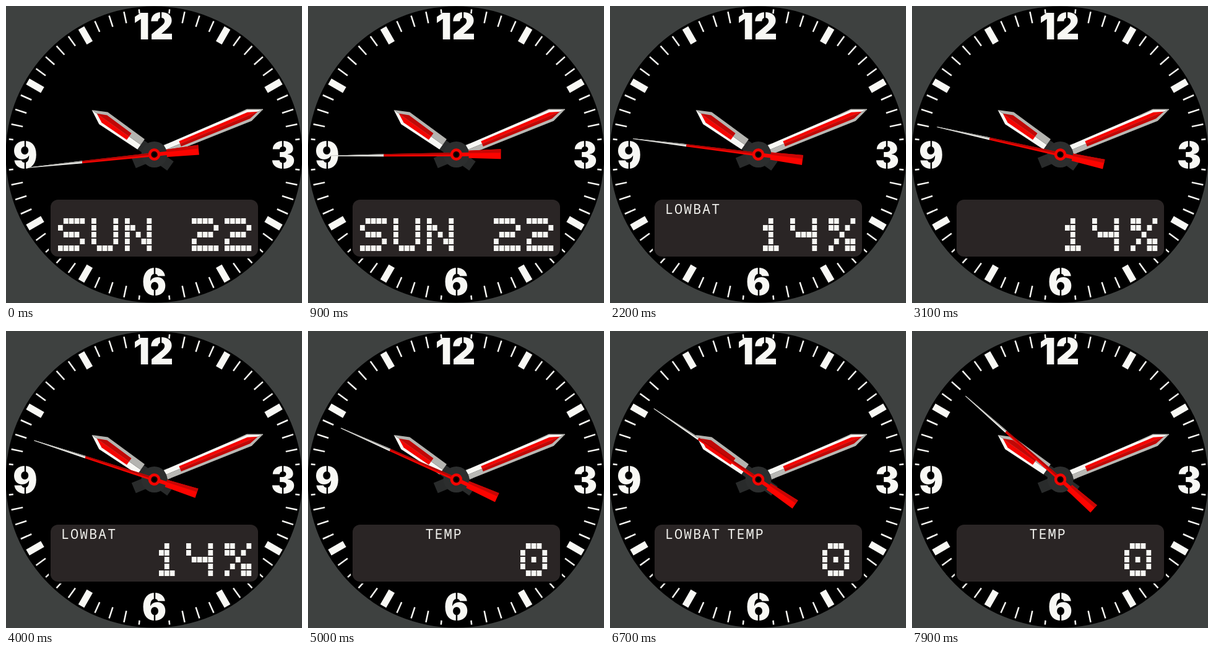
An HTML page for the animation above (8000 ms loop, 478 by 480 pixels).

```html
<!DOCTYPE html>
<html lang="en">
<head>
<meta charset="utf-8">
<title>Watch face</title>
<style>
  html, body { margin: 0; width: 100%; height: 100%; overflow: hidden; background: #3e4140; }
  svg { display: block; width: 100%; height: 100%; }
  .num { font: 900 59px Inter, "Liberation Sans", sans-serif; text-anchor: middle; fill: #f8f8f4; }
  .label { font: 500 22px "Noto Sans Mono", "DejaVu Sans Mono", monospace; letter-spacing: 1.8px; fill: #f0f0ec; }
  .gap { stroke: #000; stroke-width: 2.4; }
</style>
</head>
<body>
<svg viewBox="0 0 478 480">
  <rect width="478" height="480" fill="#3e4140"/>
  <circle cx="239" cy="240" r="239.5"/>
  <g id="ticks" stroke="#f8f8f4" transform="translate(239.5 240)"></g>

  <g class="num">
    <text x="238" y="53.5">12</text>
    <text x="447.5" y="261.5">3</text>
    <text x="239.5" y="467">6</text>
    <text x="31" y="261.5">9</text>
  </g>
  <path class="gap" d="M31 217v13M31 251v13M447 217v13M447 251v13M240 423v13M240 456v13M250 9v12"/>

  <rect x="69" y="310" width="341" height="98" rx="15"/>
  <rect x="72" y="313" width="335" height="92" rx="12" fill="#2a2525"/>
  <text class="label" x="89" y="336" id="low">LOWBAT</text>
  <text class="label" x="189.5" y="336" id="temp">TEMP</text>
  <path id="dots" fill="#f8f8f4"/>

  <g transform="translate(239.5 240) rotate(305.5)">
    <path d="M-9 32V-32H9V32Z" fill="#292b2b"/>
    <path d="M0-124L-12-101L-9-27H0Z" fill="#f8f8f4"/>
    <path d="M0-124L12-101L11-27H0Z" fill="#b4b4b0"/>
    <path d="M0-114L-7.5-99L-6.5-50H0Z" fill="#f40400"/>
    <path d="M0-114L7.5-99L6.5-50H0Z" fill="#c00806"/>
  </g>
  <g transform="translate(239.5 240) rotate(67.5)">
    <path d="M-9 36V-26H9V36Z" fill="#292b2b"/>
    <path d="M0-190L-10-166L-8-20H0Z" fill="#f8f8f4"/>
    <path d="M0-190L10-166L8-20H0Z" fill="#b8b8b4"/>
    <path d="M0-190L-10-166L-9-140" fill="none" stroke="#b4b4b0" stroke-width="1.5"/>
    <path d="M0-181L-5.5-165L-4.5-45H0Z" fill="#f40400"/>
    <path d="M0-181L5.5-165L4.5-45H0Z" fill="#c00806"/>
  </g>
  <circle cx="239.5" cy="240" r="21" fill="#2c2e2e"/>

  <g id="second">
    <path d="M-.5-204H.5L2-117H-2Z" fill="#f8f8f4"/>
    <path d="M0-204H.5L2-117H0Z" fill="#a8a8a4"/>
    <path d="M-2-117H2L3-9H-3Z" fill="#f40400"/>
    <path d="M0-117H2L3-9H0Z" fill="#b00604"/>
    <path d="M-3 8H3V20H6L8 72H-8L-6 20H-3Z" fill="#fc0400"/>
    <path d="M2 20H6L8 72H2Z" fill="#c80604"/>
    <circle r="7.5" fill="#200404" stroke="#f40400" stroke-width="4.5"/>
    <circle r="3" fill="#000"/>
  </g>
</svg>
<script>
const $ = id => document.getElementById(id);
const LOOP = 8000, STEP = 100, START_SECOND = 44;

// Minute and hour marks; those beside the numerals are shortened
for (let m = 0; m < 60; m++) {
  if (m % 15 === 0) continue;
  const beside = m % 15 === 1 || m % 15 === 14;
  const hour = m % 5 === 0;
  const tick = document.createElementNS("http://www.w3.org/2000/svg", "line");
  const attrs = {
    y1: -236,
    y2: hour ? -208.5 : beside ? -229 : -217,
    "stroke-width": hour ? 11 : 2.5,
    transform: `rotate(${m * 6})`
  };
  for (const key in attrs) tick.setAttribute(key, attrs[key]);
  $("ticks").append(tick);
}

const GLYPHS = {
  S: ".XXXX X.... .XXX. ....X XXXX.",
  U: "X...X X...X X...X X...X .XXX.",
  N: "X...X XX..X X.X.X X..XX X...X",
  2: "XXXX. ....X .XXX. X.... XXXXX",
  1: ".X. XX. .X. .X. XXX",
  4: "X...X X...X .XXXX ....X ....X",
  "%": "XX..X XX.X. ..X.. .X.XX X..XX",
  0: ".XXX. X...X X.X.X X...X .XXX."
};

function glyph(char, left) {
  let path = "";
  GLYPHS[char].split(" ").forEach((row, r) => [...row].forEach((cell, c) => {
    if (cell === "X") path += `M${left + c * 8.85} ${343 + r * 11}h7.8v9h-7.8z`;
  }));
  return path;
}

const word = (chars, lefts) => [...chars].map((ch, i) => glyph(ch, lefts[i])).join("");

// Each screen stays for three seconds; the date began a second earlier
const DATE = { dots: word("SUN22", [84, 138, 192, 300, 353]) };
const BATTERY = { dots: word("14%", [247, 291, 353]), status: true };
const TEMP = { dots: word("0", [343]), status: true, temp: true };
const SCREENS = [DATE, BATTERY, TEMP];

const show = (el, on) => el.setAttribute("visibility", on ? "visible" : "hidden");

function draw() {
  const t = Math.floor((performance.now() % LOOP) / STEP) * STEP;
  const seconds = START_SECOND + t / 1000;
  $("second").setAttribute("transform", `translate(239.5 240) rotate(${seconds * 6})`);

  const screen = SCREENS[Math.floor((t + 1000) / 3000)];
  const blink = Math.floor(seconds) % 2 === 0;
  $("dots").setAttribute("d", screen.dots);
  show($("low"), screen.status && blink);
  show($("temp"), screen.temp);
  requestAnimationFrame(draw);
}
draw();
</script>
</body>
</html>
```
